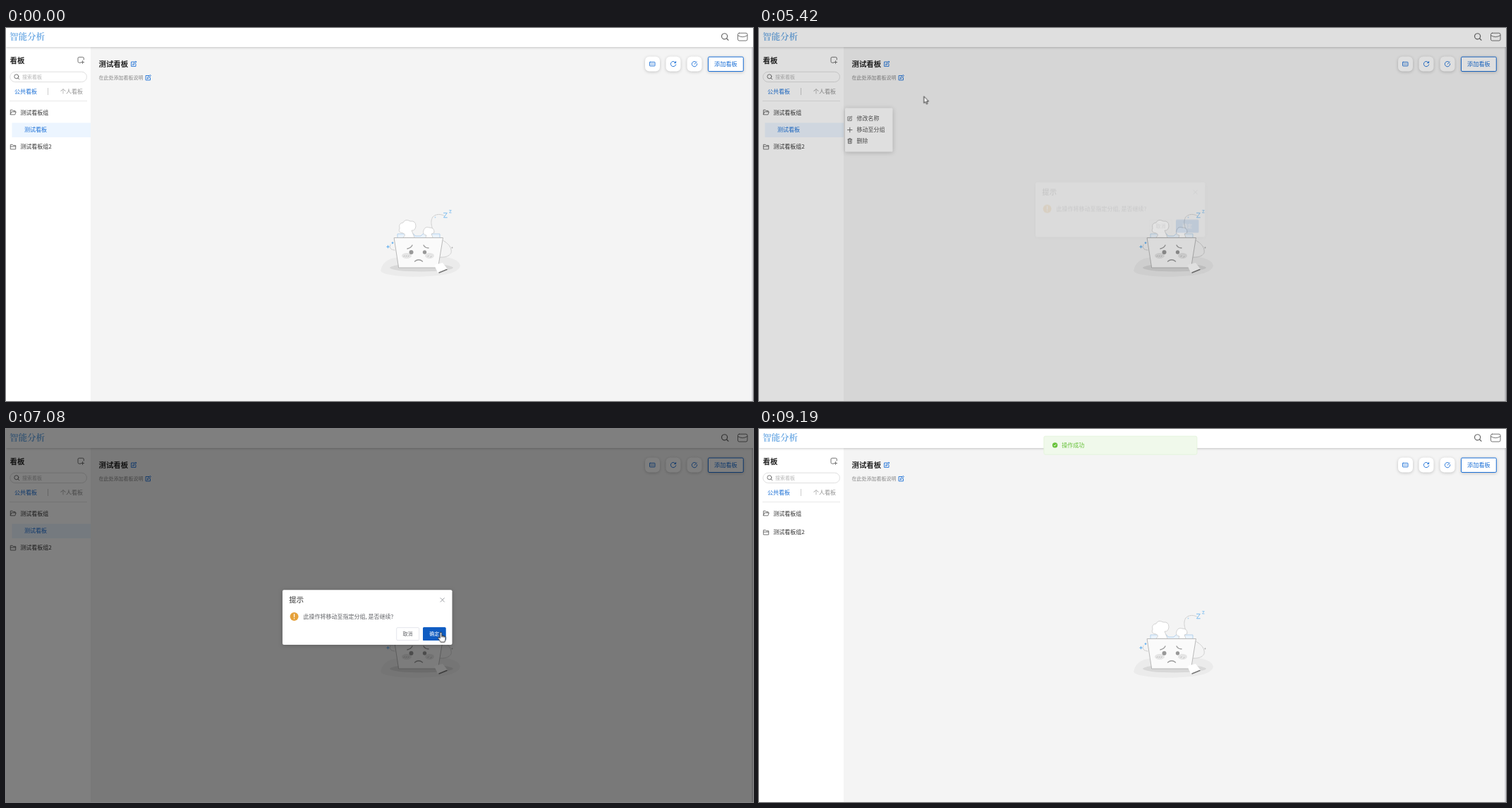
An HTML page for the animation above (9.51 s loop, 1059 by 529 pixels).

```html
<!DOCTYPE html>
<html lang="zh-CN">
<head>
<meta charset="utf-8">
<title>看板</title>
<style>
html, body { margin: 0; width: 100%; height: 100%; overflow: hidden; background: #f4f4f4; }
svg { display: block; width: 1059px; height: 529px; font: 8px "Noto Sans CJK SC", "Noto Sans CJK", sans-serif; }
text { fill: #333; white-space: pre; }
.brand { font: 900 12.5px "Noto Serif CJK SC", "Noto Serif", "Noto Sans CJK SC", serif; fill: #76afe6; }
.title { font-size: 10.4px; font-weight: 700; fill: #222; }
.small { font-size: 7px; }
text.blue { fill: #1a6fd6; }
text.grey { fill: #929292; }
.line { fill: none; stroke: #666; stroke-width: .9; stroke-linejoin: round; stroke-linecap: round; }
.line.blue { stroke: #1a6fd6; }
.rule { stroke: #e8e8e8; }
.tile { fill: #fff; filter: drop-shadow(0 1px 2px #0003); }
.panel { fill: #fff; filter: drop-shadow(0 1px 3px #0003); }

/* Timeline: 9510 ms, 1% = 95.1 ms */
.anim { animation: 9.51s infinite step-end; }
#cursor { animation-name: path; animation-timing-function: ease-in-out; }
#arrow { animation-name: arrow; }
#hand { animation-name: hand; }
#dots { animation-name: dots; }
#menu { animation-name: menu; }
#active { animation-name: active; }
#submenu { animation-name: submenu; }
#pick { animation-name: pick; }
#shade { animation-name: shade; animation-timing-function: ease; }
#dialog { animation-name: dialog; animation-timing-function: ease; }
#press { animation-name: press; }
#child { animation-name: child; }
#second { animation-name: second; }
#toast { animation-name: toast; animation-timing-function: ease; }

@keyframes path {
  0%, 4.6% { transform: translate(1032px, 531px); }
  14.721%, 15.037% { transform: translate(105px, 195px); }
  19.558%, 21.451% { transform: translate(68px, 147px); }
  28.4%, 35.857% { transform: translate(111px, 146px); }
  39.012%, 43.849% { transform: translate(150px, 143px); }
  51.314%, 59.6% { transform: translate(233.5px, 96.5px); }
  64.774%, 65.089% { transform: translate(557px, 246px); }
  68.98%, 90.852% { transform: translate(616.5px, 288px); }
  96.5%, 100% { transform: translate(1064px, 533px); }
}
@keyframes arrow {
  0% { opacity: 1; } 16.6% { opacity: 0; } 56.4% { opacity: 1; }
  67.3% { opacity: 0; } 77.9%, 100% { opacity: 1; }
}
@keyframes hand {
  0% { opacity: 0; } 16.6% { opacity: 1; } 56.4% { opacity: 0; }
  67.3% { opacity: 1; } 77.9%, 100% { opacity: 0; }
}
@keyframes dots { 0% { opacity: 0; } 18.4% { opacity: 1; } 36.8%, 100% { opacity: 0; } }
@keyframes menu { 0% { opacity: 0; } 30.1% { opacity: 1; } 58.9%, 100% { opacity: 0; } }
@keyframes active { 0% { opacity: 0; } 38% { opacity: 1; } 46.5%, 100% { opacity: 0; } }
@keyframes submenu { 0% { opacity: 0; } 38.4% { opacity: 1; } 56.3%, 100% { opacity: 0; } }
@keyframes pick { 0% { opacity: 0; } 49.6% { opacity: 1; } 56.3%, 100% { opacity: 0; } }
@keyframes shade {
  0%, 56.625% { opacity: 0; } 58.728%, 74.763% { opacity: .5; } 76.866%, 100% { opacity: 0; }
}
@keyframes dialog {
  0%, 56.625% { opacity: 0; transform: translateY(-11px); }
  59.779%, 74.763% { opacity: 1; transform: none; }
  77.918%, 100% { opacity: 0; transform: translateY(-11px); }
}
@keyframes press { 0% { opacity: 0; } 67.3% { opacity: 1; } 74.763%, 100% { opacity: 0; } }
@keyframes child { 0% { opacity: 1; } 77.6%, 100% { opacity: 0; } }
@keyframes second { 0% { transform: none; } 77.6%, 100% { transform: translateY(-22px); } }
@keyframes toast {
  0%, 77.4% { opacity: 0; transform: translateY(-27px); }
  80.547%, 100% { opacity: 1; transform: none; }
}
</style>
</head>
<body>
<svg viewBox="0 0 1059 529">
  <defs>
    <g id="edit"><path d="M1-3H-3.4V3.4H3V0M-1.2 1.2-.8-.6 3-4 4-3 .4.8Z"/></g>
    <g id="folder"><path d="M-3.7 3V-3.2H-.8L.2-2H3.7V3ZM-3.7-.4H3.7"/></g>
    <g id="open"><path d="M-3.7 3V-3.3H-1L0-2.1H3V-.6M-3.7 3-2.3-.6H4.2L2.9 3Z"/></g>
    <g id="glass"><circle r="3"/><path d="M2.2 2.2 4 4"/></g>
  </defs>

  <rect width="1059" height="529" fill="#f4f4f4"/>
  <rect x="1057.3" y="27" width="1.7" height="502" fill="#cfcfd4"/>
  <rect y="27" width="120" height="502" fill="#fff"/>
  <rect width="1059" height="27" fill="#fff" style="filter:drop-shadow(0 1px 1.5px #0003)"/>
  <text class="brand" x="5" y="17">智能分析</text>
  <g class="line">
    <use href="#glass" transform="translate(1018.6 11.8) scale(1.35)"/>
    <rect x="1037.5" y="7.2" width="13.5" height="10.8" rx="2"/>
    <path d="M1037.5 10.5Q1044.2 15 1051 10.5"/>
  </g>

  <!-- sidebar -->
  <text class="title" x="5.5" y="50">看板</text>
  <path class="line" d="M110.3 45V43Q110.3 41.3 108.600 41.300H103.700Q102 41.300 102 43V47.500Q102 49.200 103.700 49.200H106M108.600 46.500V50.500M106.600 48.500H110.600"/>
  <rect x="5.700" y="62.200" width="108.800" height="14.300" rx="7.150" fill="#fff" stroke="#dcdcdc" stroke-width=".9"/>
  <use class="line" href="#glass" x="14.800" y="68.800"/>
  <text class="small" x="23" y="72" style="fill:#b4b4b4">搜索看板</text>
  <text class="blue" x="12" y="93">公共看板</text>
  <path d="M59.500 85V95" stroke="#ccc"/>
  <text class="grey" x="77" y="93">个人看板</text>
  <path class="rule" d="M5 103.500H115"/>
  <use class="line" href="#open" x="10" y="119.500"/>
  <text x="20.300" y="123.200">测试看板组</text>
  <g id="child" class="anim">
    <rect x="8.500" y="134.500" width="111.500" height="20.500" fill="#ecf5ff"/>
    <text class="blue" x="26" y="147.300">测试看板</text>
    <g id="dots" class="anim" fill="#1a6fd6">
      <circle cx="107.900" cy="144.500" r=".9"/><circle cx="110.500" cy="144.500" r=".9"/><circle cx="113.100" cy="144.500" r=".9"/>
    </g>
  </g>
  <g id="second" class="anim">
    <use class="line" href="#folder" x="10" y="168.500"/>
    <text x="20.300" y="171.400">测试看板组2</text>
  </g>

  <!-- board header -->
  <text class="title" x="131.500" y="54.800">测试看板</text>
  <use class="line blue" href="#edit" x="181" y="51"/>
  <text class="small" x="131.500" y="73" style="fill:#888">在此处添加看板说明</text>
  <use class="line blue" href="#edit" x="201.500" y="70.500"/>
  <rect class="tile" x="906" y="40.500" width="21" height="21" rx="6"/>
  <rect class="tile" x="935.500" y="40.500" width="21" height="21" rx="6"/>
  <rect class="tile" x="965.500" y="40.500" width="21" height="21" rx="6"/>
  <g class="line blue">
    <rect x="912.500" y="48.300" width="7.500" height="5.600" rx=".6"/>
    <path d="M914.400 50.200V52M916.200 50.200V52M918 50.200V52" stroke-width=".6"/>
    <path d="M949.300 49.200A3.700 3.700 0 1 0 949.700 51.800M949.600 47.500V49.500H947.500"/>
    <path d="M978.200 48.100A3.700 3.700 0 1 0 979.700 50.700M976 51.200 979.300 48.200"/>
  </g>
  <rect class="tile" x="995.500" y="41" width="49.800" height="20.500" rx="1.500" stroke="#1a6fd6"/>
  <text class="blue" x="1004" y="54.200" style="font-size:8.200px;font-weight:500">添加看板</text>

  <!-- empty state -->
  <g stroke-linecap="round" stroke-linejoin="round">
    <path d="M531 344Q533 332 546 327Q570 321 600 325Q640 322 644 337Q642 348 612 351Q570 355 545 350Q532 348 531 344Z" fill="#ebebeb"/>
    <ellipse cx="589" cy="340" rx="45" ry="5.500" fill="#d8d8d8"/>
    <g fill="none" stroke="#c4c4c4" stroke-width=".8" stroke-dasharray="2 1">
      <path d="M607 290Q600 276 605 268Q611 262 621 266M617 300Q633 308 631 319Q627 326 614 325M551 315Q542 314 545 307"/>
    </g>
    <path d="M555 298V292H578L580 295H588L591 292H615V298Z" fill="#eaf3fc" stroke="#a9cbe9" stroke-width=".8"/>
    <g fill="#fff" stroke="#c9c9c9" stroke-width=".8">
      <path d="M563 297Q568 293 563 291Q555 290 558 284Q556 277 563 276Q566 270 573 274Q581 273 581 281Q580 288 575 287L579 297Z"/>
      <path d="M595 297 596 294Q590 293 592 287Q594 281 600 283Q607 283 607 289Q606 292 603 292L605 297Z"/>
    </g>
    <path d="M550.500 297.500H619.500L612.500 340H557Z" fill="#fafafa" stroke="#b8b8b8"/>
    <ellipse cx="568" cy="323" rx="7" ry="4" fill="#e5e5e5"/>
    <ellipse cx="600.500" cy="323" rx="6.500" ry="4" fill="#e5e5e5"/>
    <g fill="#999"><circle cx="574.500" cy="318" r="3"/><circle cx="593.500" cy="318" r="2.700"/></g>
    <path d="M569 313Q574 312 576 308M592 308Q594 312 599 312M579.500 331Q585 326.500 590.500 331" fill="none" stroke="#999" stroke-width="1.300"/>
    <path d="M564 324 565 323M567 324 568 323M570 324 571 323M598 324 599 323M602 325 603 324" stroke="#aaa" stroke-width=".8"/>
    <path d="M607 336 619 333 626 342 612 347Z" fill="#fff"/>
    <path d="M614 347 625 342.500" stroke="#777" stroke-width="1.500"/>
    <g fill="none" stroke="#7dbdf0">
      <path d="M620.500 262.300H625.300L620.500 268.800H625.300"/>
      <path d="M628.600 258.500H631.200L628.600 262H631.200" stroke-width=".8"/>
    </g>
    <path d="M541.500 307.500 542.300 309.500 544.300 310.300 542.300 311.100 541.500 313.100 540.700 311.100 538.700 310.300 540.700 309.500ZM548 303 549.600 304.800 548 306.600 546.400 304.800Z" fill="#6fb5ef"/>
    <circle cx="632.500" cy="311.500" r=".9" fill="#aaa"/><circle cx="608.500" cy="268.500" r=".9" fill="#b5d6f0"/>
  </g>

  <!-- context menu -->
  <g id="menu" class="anim">
    <rect class="panel" x="122" y="113.500" width="67.500" height="62" rx="1.500"/>
    <text x="138.500" y="131.200" style="fill:#555">修改名称</text>
    <text x="138.500" y="147.300" style="fill:#555">移动至分组</text>
    <text x="138.500" y="163.300" style="fill:#555">删除</text>
    <g class="line" stroke-width=".8">
      <use href="#edit" transform="translate(128.700 128.500) scale(.85)"/>
      <path d="M125.500 144.500H132M128.800 141.200V147.800"/>
      <path d="M125.800 158H131.800M126.500 158V163.700H131.100V158M127.700 158V156.700H129.900V158M128.100 159.700V162M129.600 159.700V162"/>
    </g>
    <g id="active" class="anim">
      <rect x="122" y="137" width="67.500" height="15" fill="#ecf5ff"/>
      <path class="line blue" d="M125.500 144.500H132M128.800 141.200V147.800"/>
      <text class="blue" x="138.500" y="147.300">移动至分组</text>
    </g>
  </g>
  <g id="submenu" class="anim">
    <rect class="panel" x="192.500" y="58.500" width="114.500" height="172" rx="1.500"/>
    <rect x="198" y="64" width="103" height="20.800" fill="#eaf3fe"/>
    <text x="204" y="77.300">移动至分组</text>
    <use class="line" href="#open" x="208.700" y="95.500"/>
    <text class="small" x="219.500" y="98.800">测试看板组2</text>
    <path class="rule" d="M198 108H301M198 224.500H301"/>
    <g id="pick" class="anim">
      <use class="line blue" href="#open" x="208.700" y="95.500"/>
      <text class="small blue" x="219.500" y="98.800">测试看板组2</text>
    </g>
  </g>

  <rect id="shade" class="anim" width="1059" height="529"/>
  <g id="dialog" class="anim">
    <rect class="panel" x="392" y="228.300" width="240.500" height="77.700" rx="2"/>
    <text x="401.300" y="246" style="font-size:10.400px">提示</text>
    <path class="line" d="M616 239.700 621.400 245.100M621.400 239.700 616 245.100" style="stroke:#909399"/>
    <circle cx="408.600" cy="266" r="6" fill="#e6a23c"/>
    <path d="M408.600 262.700V266.600M408.600 268.700V269.100" stroke="#fff" stroke-width="1.200" stroke-linecap="round"/>
    <text x="421.500" y="269" style="fill:#606266">此操作将移动至指定分组, 是否继续?</text>
    <rect x="553.700" y="281.700" width="32" height="18" rx="1.500" fill="#fff" stroke="#dcdfe6" stroke-width=".8"/>
    <text class="small" x="562.600" y="293.400" style="fill:#606266">取消</text>
    <rect x="591" y="281.300" width="32.500" height="18.700" rx="1.500" fill="#1f70d6"/>
    <rect id="press" class="anim" x="591" y="281.300" width="32.500" height="18.700" rx="1.500" fill="#0f5cc2"/>
    <text class="small" x="600.300" y="293.400" style="fill:#fff;font-weight:500">确定</text>
  </g>

  <g id="toast" class="anim">
    <rect x="403.900" y="10.200" width="217" height="26" rx="2" fill="#f0f9eb" stroke="#e1f3d8" stroke-width=".8"/>
    <circle cx="419.600" cy="22.900" r="3.700" fill="#67c23a"/>
    <path d="M417.900 23 419.200 24.200 421.400 21.700" fill="none" stroke="#fff" stroke-width=".9"/>
    <text x="429.300" y="26" style="fill:#67c23a">操作成功</text>
  </g>

  <g id="cursor" class="anim" fill="#fff" stroke="#222" stroke-width=".9" stroke-linejoin="round">
    <path id="arrow" class="anim" d="M.3.500V10L2.500 8 4 11.400 5.600 10.700 4.100 7.400H7Z"/>
    <path id="hand" class="anim" d="M-1.200 8.800V1.300Q-1 .2 0 .2T1.200 1.300V5.200Q2.200 4.500 3 5.500Q4.200 5 4.800 6.100Q6.400 5.700 6.600 7.300V10.200Q6.300 12 5.400 14.200H-.4Q-1.200 12.500-2.600 10.800L-4 8.600Q-4 7.200-2.700 7.500ZM1.200 5.200V7.300M3 5.500V7.400M4.800 6.100V7.700"/>
  </g>
</svg>
</body>
</html>
```
